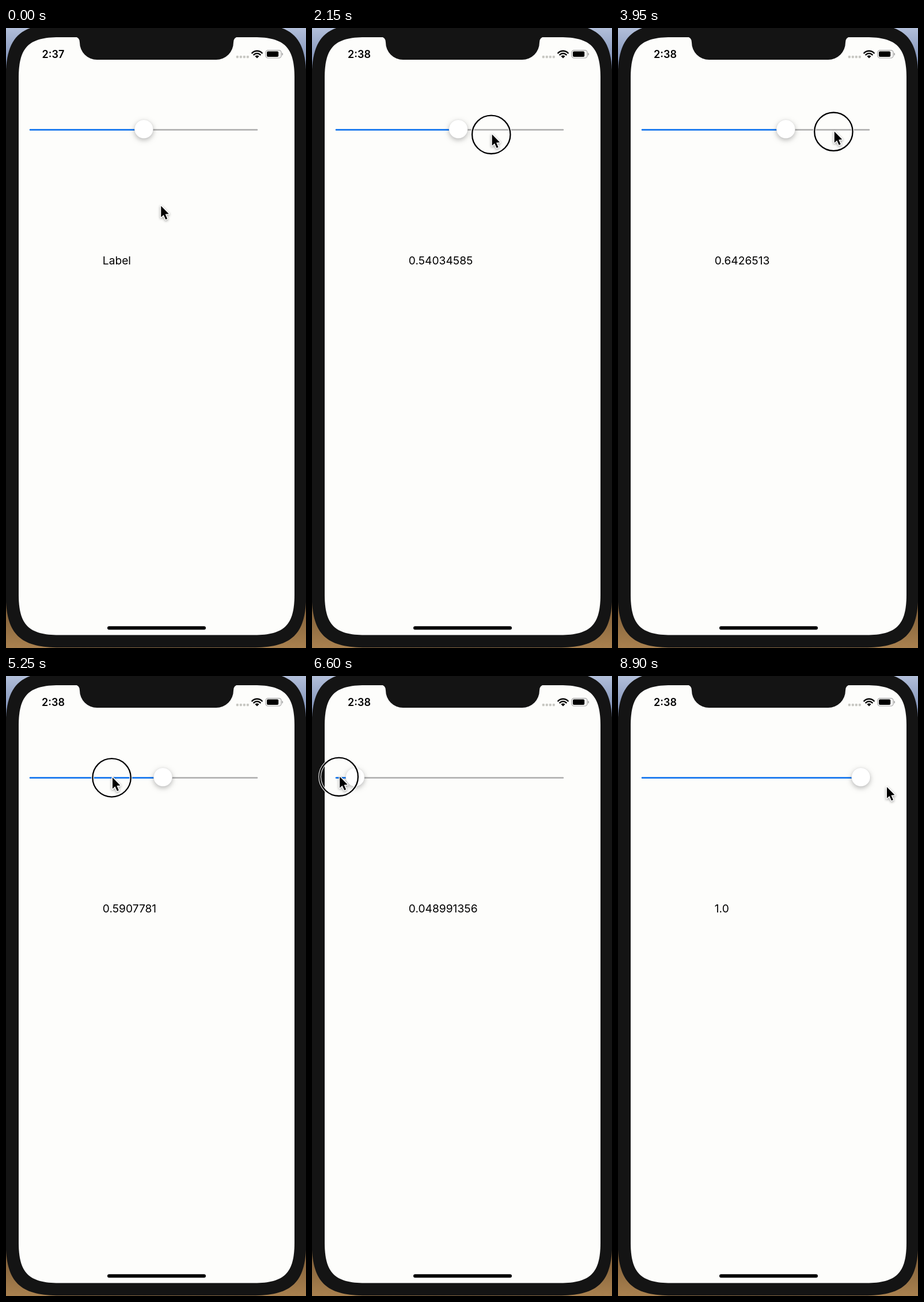
Write an HTML page with a canvas that moves like this. It is 521 px wide and 1075 px high and loops after 9 s.

```html
<!DOCTYPE html>
<html lang="en">
<head>
<meta charset="utf-8">
<title>Slider demo</title>
<style>
html, body { margin: 0; width: 100%; height: 100%; overflow: hidden; background: #141414; }
canvas { display: block; width: 521px; height: 1075px; }
</style>
</head>
<body>
<canvas id="stage"></canvas>
<script>
const W = 521, H = 1075, LOOP = 9000, STEP = 50;
const BEZEL = '#141414', PAPER = '#fdfdfb';
const CLOCK_TURN = 1000, PRESS = 1600, RELEASE = 8350, FIRST_VALUE = 1800;
const LAG = 200; // the slider trails the pointer by this much

const canvas = document.getElementById('stage');
const ratio = window.devicePixelRatio || 1;
canvas.width = W * ratio;
canvas.height = H * ratio;
const ctx = canvas.getContext('2d');
ctx.scale(ratio, ratio);

// Time and slider value; the pointer may overshoot the range 0 to 1
const DRAG = [
  [200, 0.578], [1800, 0.5], [2150, 0.54034585], [2350, 0.697], [2900, 1.06],
  [3500, 0.3], [3950, 0.6426513], [4150, 0.87], [4600, 1.06], [5250, 0.5907781],
  [5450, 0.347], [6600, 0.048991356], [6800, -0.028], [7700, 0.028818443],
  [7900, 1.072], [8300, 1.12]
];
// Time and pointer height
const HEIGHT = [[0, 307], [1350, 185], [2150, 183], [6600, 173], [7700, 191]];

const clamp = (v, lo, hi) => Math.min(hi, Math.max(lo, v));
const trackX = v => 57 + 364.8 * v;

// Smooth curve through the keys, flat at turning points and at both ends
function sample(keys, t) {
  const last = keys.length - 1;
  t = clamp(t, keys[0][0], keys[last][0]);
  let i = 0;
  while (i < last && t >= keys[i + 1][0]) i++;
  const [t0, v0] = keys[i];
  if (t === t0) return v0;
  const [t1, v1] = keys[i + 1];
  const slope = k => (keys[k + 1][1] - keys[k][1]) / (keys[k + 1][0] - keys[k][0]);
  const tangent = k => {
    if (k === 0 || k === last) return 0;
    const a = slope(k - 1), b = slope(k);
    return a * b <= 0 ? 0 : 2 * a * b / (a + b);
  };
  const d = t1 - t0, u = (t - t0) / d, w = 1 - u;
  return w * w * (1 + 2 * u) * v0 + u * w * w * d * tangent(i)
    + u * u * (3 - 2 * u) * v1 - u * u * w * d * tangent(i + 1);
}

function box(x, y, w, h, r, color) {
  ctx.beginPath();
  ctx.roundRect(x, y, w, h, r);
  ctx.fillStyle = color;
  ctx.fill();
}

// Rectangle whose corners ease gradually into the straight sides
function softBox(x0, y0, x1, y1, reach, color) {
  const k = reach * 0.25;
  ctx.beginPath();
  ctx.moveTo(x0 + reach, y0);
  ctx.lineTo(x1 - reach, y0);
  ctx.bezierCurveTo(x1 - k, y0, x1, y0 + k, x1, y0 + reach);
  ctx.lineTo(x1, y1 - reach);
  ctx.bezierCurveTo(x1, y1 - k, x1 - k, y1, x1 - reach, y1);
  ctx.lineTo(x0 + reach, y1);
  ctx.bezierCurveTo(x0 + k, y1, x0, y1 - k, x0, y1 - reach);
  ctx.lineTo(x0, y0 + reach);
  ctx.bezierCurveTo(x0, y0 + k, x0 + k, y0, x0 + reach, y0);
  ctx.fillStyle = color;
  ctx.fill();
}

function line(x0, x1, y, width, color) {
  ctx.beginPath();
  ctx.moveTo(x0, y);
  ctx.lineTo(x1, y);
  ctx.lineWidth = width;
  ctx.strokeStyle = color;
  ctx.stroke();
}

function outline(width, color) {
  ctx.lineWidth = width;
  ctx.strokeStyle = color;
  ctx.stroke();
}

function text(str, x, y, font, align) {
  ctx.font = font + ' Inter, sans-serif';
  ctx.textAlign = align;
  ctx.fillStyle = '#000';
  ctx.fillText(str, x, y);
}

function shadow(color, blur, y) {
  ctx.shadowColor = color;
  ctx.shadowBlur = blur * ratio;
  ctx.shadowOffsetY = y * ratio;
}

function drawPhone() {
  const sky = ctx.createLinearGradient(0, 0, 0, H);
  sky.addColorStop(0, '#b2bfda');
  sky.addColorStop(0.05, '#8495ba');
  sky.addColorStop(0.15, '#2c2840');
  sky.addColorStop(0.85, '#33261f');
  sky.addColorStop(0.95, '#8a673e');
  sky.addColorStop(1, '#a9814f');
  ctx.fillStyle = sky;
  ctx.fillRect(0, 0, W, H);
  softBox(-0.4, -7, 521.4, 1074.3, 94, BEZEL);
  softBox(22, 16, 501, 1052.6, 70, PAPER);

  // Notch
  ctx.beginPath();
  ctx.moveTo(119, 15);
  ctx.quadraticCurveTo(128, 16, 128, 25);
  ctx.arcTo(128, 55, 158, 55, 30);
  ctx.arcTo(395, 55, 395, 25, 30);
  ctx.lineTo(395, 25);
  ctx.quadraticCurveTo(395, 16, 404, 15);
  ctx.fillStyle = BEZEL;
  ctx.fill();
  box(176, 1037.3, 171, 6, 3, '#000');
}

function drawStatus(t) {
  text(t < CLOCK_TURN ? '2:37' : '2:38', 82, 52, '600 18px', 'center');
  for (let i = 0; i < 4; i++) box(399.8 + i * 6, 48, 4, 4.2, 1.2, '#c8c8c3');

  // Wi-Fi fan
  const from = -Math.PI * 0.75, to = -Math.PI * 0.25;
  for (const r of [12.2, 7.9]) {
    ctx.beginPath();
    ctx.arc(436, 52, r, from, to);
    outline(2.5, '#000');
  }
  ctx.beginPath();
  ctx.moveTo(436, 52.5);
  ctx.arc(436, 52.5, 5, from, to);
  ctx.fillStyle = '#000';
  ctx.fill();

  // Battery
  ctx.beginPath();
  ctx.roundRect(451, 38.6, 27, 13.4, 4);
  outline(1.2, '#a3a3a3');
  box(453, 40.6, 20.2, 9.5, 2, '#000');
  box(479.4, 43, 1.6, 4.6, [0, 1.5, 1.5, 0], '#a3a3a3');
}

function drawSlider(value) {
  const x = trackX(value);
  ctx.lineCap = 'round';
  line(42, 436, 176.5, 2.4, '#acacac');
  line(42, x, 176.5, 2.5, '#0b75f8');
  ctx.save();
  shadow('rgba(0,0,0,.27)', 9, 3);
  ctx.beginPath();
  ctx.arc(x, 175.3, 16.3, 0, Math.PI * 2);
  ctx.fillStyle = '#fff';
  ctx.fill();
  ctx.restore();
  outline(0.5, 'rgba(0,0,0,.13)');
}

function format(v) {
  return Number.isInteger(v) ? v.toFixed(1) : String(Number(v.toPrecision(8)));
}

function drawPointer(x, y, pressed) {
  if (pressed) {
    ctx.beginPath();
    ctx.arc(x, y + 1.8, 33.2, 0, Math.PI * 2);
    outline(4.8, 'rgba(255,255,255,.9)');
    outline(2.3, '#000');
  }
  ctx.save();
  ctx.translate(x + 0.6, y);
  ctx.lineJoin = 'round';
  shadow('rgba(0,0,0,.4)', 4, 1.5);
  const arrow = new Path2D('M.8 1.5V21l4.4-4 3.6 8 2.9-1.3-3.5-7.9 6.1-.5z');
  ctx.lineWidth = 3;
  ctx.strokeStyle = '#fff';
  ctx.stroke(arrow);
  shadow('transparent', 0, 0);
  ctx.fillStyle = '#000';
  ctx.fill(arrow);
  ctx.restore();
}

function draw(now) {
  const t = Math.floor((now % LOOP) / STEP) * STEP;
  const touched = t >= FIRST_VALUE;
  const value = touched ? clamp(sample(DRAG, t), 0, 1) : 0.5;
  drawPhone();
  drawStatus(t);
  drawSlider(value);
  text(touched ? format(value) : 'Label', 167.8, 409.5, '400 19.2px', 'left');
  drawPointer(trackX(sample(DRAG, t + LAG)), sample(HEIGHT, t), t >= PRESS && t < RELEASE);
}

const start = performance.now();
function tick() {
  draw(performance.now() - start);
  requestAnimationFrame(tick);
}
tick();
</script>
</body>
</html>
```
